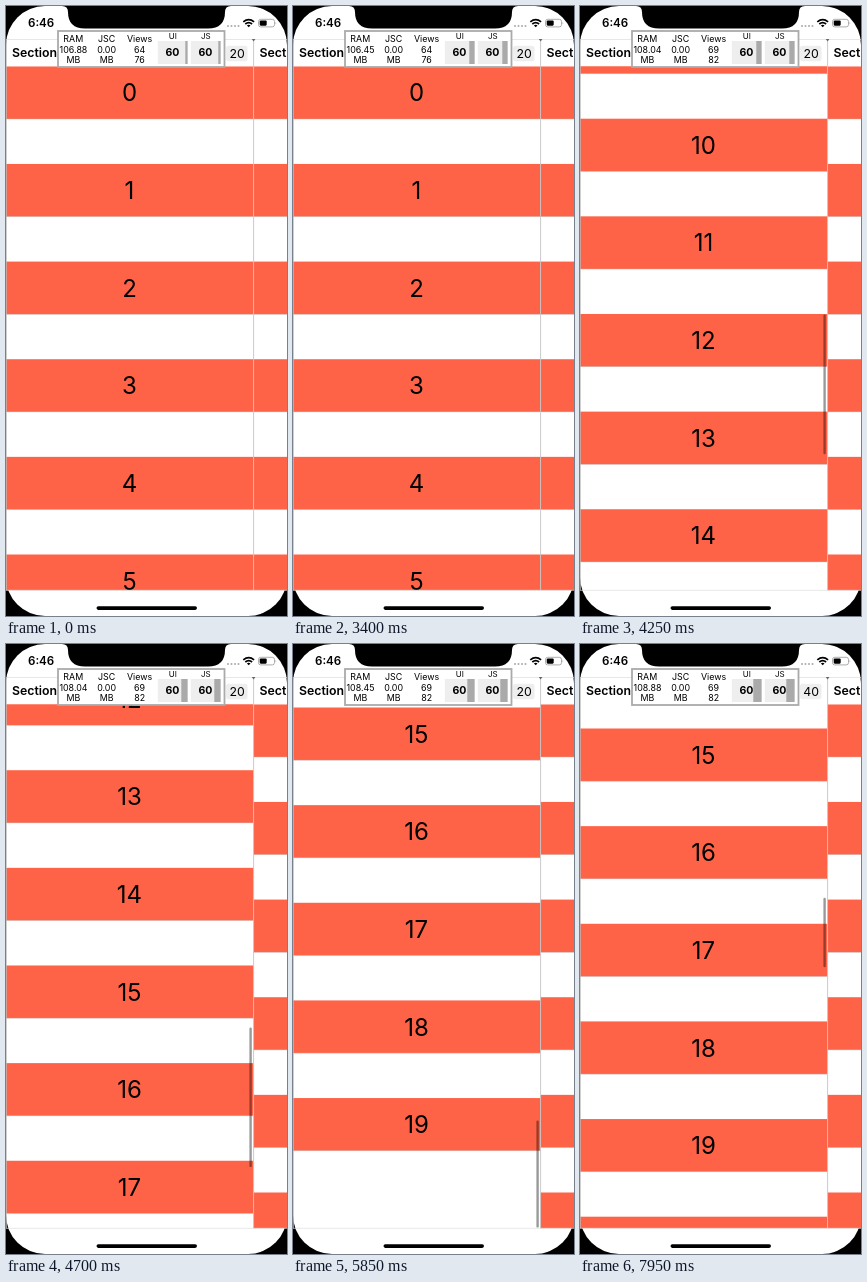
Recreate the animation shown at these times as an HTML page. Size 281 by 610 pixels, loop 8 s.

```html
<!DOCTYPE html>
<html lang="en">
<head>
<meta charset="utf-8">
<title>Section list</title>
<style>
  html, body { margin: 0; width: 100%; height: 100%; overflow: hidden; background: #000; }
  svg { display: block; width: 100%; height: 100%; font-family: Inter, Roboto, sans-serif; }
  .mid { text-anchor: middle; }
  .num { font-size: 24px; }
  .stat { font-size: 8.9px; }
  .head { font-size: 12.3px; font-weight: 600; }
  .fps { font-size: 10.5px; font-weight: 700; }
</style>
</head>
<body>
<svg id="stage" viewBox="0 0 281 610">
  <defs>
    <clipPath id="leftClip"><rect y="60.3" width="247.5" height="523.9"/></clipPath>
    <clipPath id="rightClip"><rect x="247.5" y="60.3" width="33.5" height="523.9"/></clipPath>
  </defs>
  <rect width="281" height="610" fill="#000"/>
  <rect width="281" height="610" rx="39" fill="#fff"/>
  <path d="M56 0Q62 0 62 6Q62 22.5 79 22.5H202Q219 22.5 219 6Q219 0 225 0Z"/>

  <text x="22" y="21" font-size="11.6" font-weight="600">6:46</text>
  <g fill="#aaa">
    <circle cx="222" cy="20" r="1"/><circle cx="225.5" cy="20" r="1"/>
    <circle cx="229" cy="20" r="1"/><circle cx="232.5" cy="20" r="1"/>
  </g>
  <g fill="none" stroke="#000" stroke-width="1.7">
    <path d="M237.3 15.8Q242.7 11.3 248.1 15.8"/>
    <path d="M239.3 18Q242.7 15.2 246.1 18"/>
  </g>
  <path d="M240.9 19.4Q242.7 18.1 244.5 19.4L242.7 21.3Z"/>
  <rect x="252.5" y="13.3" width="16" height="7.6" rx="2.2" fill="none" stroke="#999" stroke-width=".8"/>
  <rect x="253.7" y="14.5" width="7" height="5.2" rx="1.1"/>
  <path d="M269.6 15.7Q271 17.1 269.6 18.5Z" fill="#999"/>

  <g clip-path="url(#leftClip)"><g id="left"></g></g>
  <g clip-path="url(#rightClip)"><g id="right"></g></g>
  <rect id="thumb" x="243.4" width="2.4" rx="1.2" fill="#000"/>
  <path d="M0 33.5H281M0 584.3H281" stroke="#ddd" stroke-width=".7"/>
  <path d="M.4 33V584.3M247.6 33V584.3" stroke="#bbb" stroke-width=".8"/>
  <path d="M245.8 33H249.4L247.6 35.5Z" fill="#666"/>

  <text class="head" x="6" y="51.4">Section</text>
  <text class="head" x="253.6" y="51.4">Section</text>
  <rect x="220" y="39.8" width="21.5" height="15.4" rx="2.5" fill="#eee"/>
  <text id="count" class="mid" x="231.2" y="51.8" font-size="12.3"></text>

  <rect x="52" y="25" width="166.5" height="36" fill="#fff" stroke="#aaa" stroke-width="1.8"/>
  <g id="panel"></g>
  <rect x="90.5" y="600.3" width="100.5" height="3.6" rx="1.8"/>
</svg>
<script>
const LOOP = 8000, STEP = 50;
const TOP = 60.3, VIEW = 524, PITCH = 97.64, ROW = 52.7;
const END = 1428.8;

const $ = id => document.getElementById(id);

function add(parent, tag, attrs, text) {
  const el = document.createElementNS("http://www.w3.org/2000/svg", tag);
  for (const k in attrs) el.setAttribute(k, attrs[k]);
  if (text !== undefined) el.textContent = text;
  parent.appendChild(el);
  return el;
}

function addRow(parent, i, x, width) {
  const g = add(parent, "g", {});
  const y = TOP + i * PITCH;
  add(g, "rect", { x, y, width, height: ROW, fill: "#ff6347" });
  add(g, "rect", { x, y: y + ROW - .3, width, height: .6, fill: "#bbb", opacity: .7 });
  add(g, "text", { class: "mid num", x: x + 123.5, y: y + 35.1 }, i);
  return g;
}

const rows = Array.from({ length: 22 }, (_, i) => addRow($("left"), i, 0, 247.5));
for (let i = 0; i < 6; i++) addRow($("right"), i, 247.5, 247.5);

const panel = $("panel");
const stat = (x, y, s) => add(panel, "text", { class: "mid stat", x, y }, s);
stat(67.3, 36.3, "RAM");
const ram = stat(67.5, 47.2, "");
stat(67.3, 57.3, "MB");
stat(100.6, 36.3, "JSC");
stat(100.6, 47.2, "0.00");
stat(100.6, 57.3, "MB");
stat(133.6, 36.3, "Views");
const shown = stat(133.6, 47.2, "");
const total = stat(133.6, 57.3, "");

function meter(x, name) {
  add(panel, "text", { class: "mid", x: x + 15, y: 33.2, "font-size": 8 }, name);
  add(panel, "rect", { x, y: 35, width: 29.8, height: 23, fill: "#eee" });
  const bar = add(panel, "rect", { y: 35, height: 23, fill: "#aaa" });
  add(panel, "text", { class: "mid fps", x: x + 14.6, y: 50.2 }, 60);
  return (n) => {
    const w = 2.3 + n;
    bar.setAttribute("x", x + 29.8 - w);
    bar.setAttribute("width", w);
  };
}
const ui = meter(151.8, "UI"), js = meter(184.8, "JS");

const passed = (times, t) => times.filter(v => t >= v).length;
const ramTimes = [1150, 2250, 3550, 5700, 6700];
const ramValues = ["106.88", "106.43", "106.45", "108.04", "108.45", "108.88"];
const uiTimes = [250, 1200, 3400, 4650, 5800, 7050];
const jsTimes = [250, 1450, 3400, 4650, 5800, 7050];

// First fling decays exponentially after the finger lifts
const glide = t => 1427 - 503 * Math.exp((4250 - t) / 555);

function scrollAt(t) {
  if (t < 3450) return 0;
  if (t < 3750) return 189 * ((t - 3450) / 300) ** 3.5;
  if (t < 5500) return glide(t);
  if (t < 5850) {
    const u = (t - 5500) / 350, from = glide(5500);
    return from + (1461.4 - from) * u * u * (3 - 2 * u);
  }
  if (t < 6500) {
    const u = (t - 5850) / 100;
    return END + 32.6 * (1 + u) * Math.exp(-u);
  }
  if (t < 7900) return END;
  return END + 11.6 * ((t - 7850) / 100) ** 2;
}

function thumbAlpha(t) {
  if (t < 3500) return 0;
  if (t < 6400) return .4;
  if (t < 6800) return .4 * (1 - (t - 6400) / 400) ** 2;
  return t < 7900 ? 0 : .4;
}

function draw(time) {
  const t = Math.floor(time / STEP) * STEP;
  const s = scrollAt(t);
  const size = t < 7450 ? 20 : 40;
  $("left").setAttribute("transform", `translate(0 ${-s})`);
  rows.forEach((r, i) => r.setAttribute("visibility", i < size ? "visible" : "hidden"));
  $("count").textContent = size;

  const ratio = VIEW / (size * PITCH);
  const max = size * PITCH - VIEW;
  const over = Math.max(0, s - max);
  $("thumb").setAttribute("y", TOP + .3 + Math.min(s, max) * ratio + over);
  $("thumb").setAttribute("height", VIEW * ratio - over - 1);
  $("thumb").setAttribute("opacity", thumbAlpha(t));

  ram.textContent = ramValues[passed(ramTimes, t)];
  shown.textContent = t < 3550 ? 64 : 69;
  total.textContent = t < 3550 ? 76 : 82;
  ui(passed(uiTimes, t));
  js(passed(jsTimes, t));
}

const start = performance.now();
function tick() {
  draw((performance.now() - start) % LOOP);
  requestAnimationFrame(tick);
}
tick();
</script>
</body>
</html>
```
